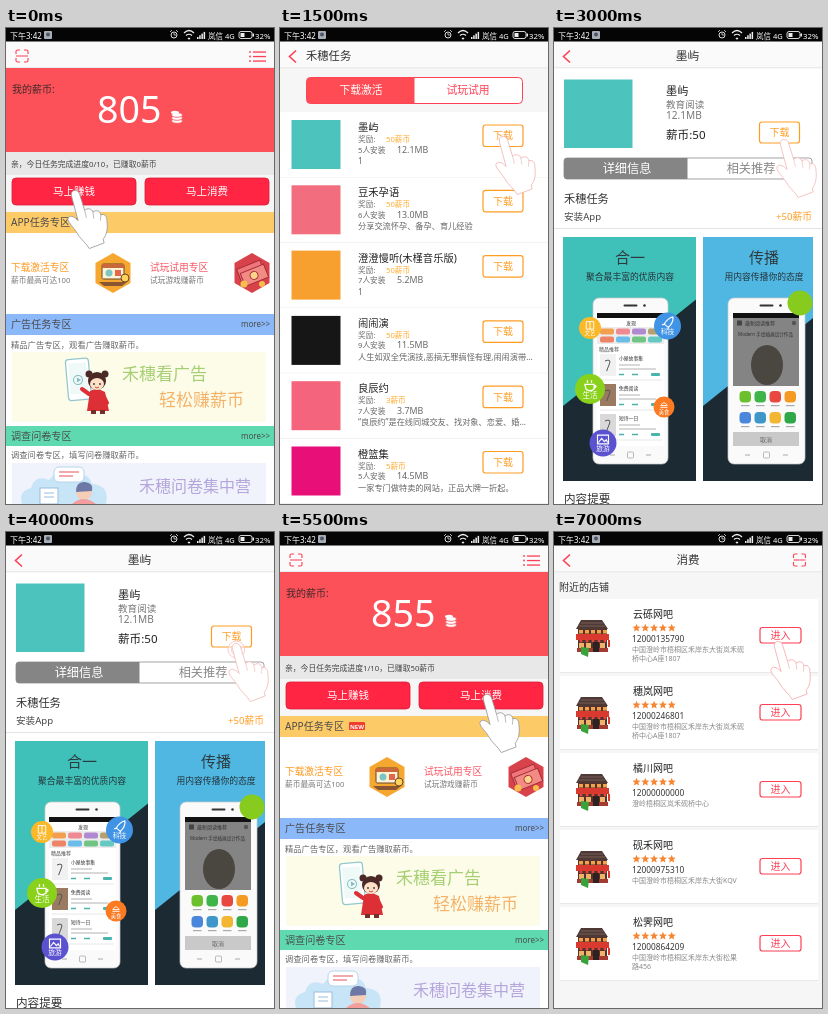
Animation of 268x476 px, one loop 8000 ms. Source, as an HTML page:

```html
<!DOCTYPE html>
<html lang="zh-CN">
<head>
<meta charset="utf-8">
<title>任务演示</title>
<style>
html, body { margin: 0; width: 100%; height: 100%; overflow: hidden; background: #f5f5f5; }
svg { display: block; width: 100vw; height: 100vh; }
text { font-family: "Noto Sans", "Noto Sans CJK SC", "Noto Sans CJK", sans-serif; white-space: pre; }
</style>
</head>
<body>
<svg id="stage" viewBox="0 0 268 476"></svg>
<script>
const RED = '#ff3f55', ORANGE = '#ff9d23', INK = '#333', GRAY = '#777', TEAL = '#4cc3bd';
const BRAND = '禾穗', APP = '墨屿';

const text = (x, y, size, str, fill = INK, extra = '') =>
  `<text x="${x}" y="${y}" font-size="${size}" fill="${fill}" ${extra}>${str}</text>`;
const mid = (x, y, size, str, fill, extra = '') =>
  text(x, y, size, str, fill, `text-anchor="middle" ${extra}`);
const rect = (x, y, w, h, fill, extra = '') =>
  `<rect x="${x}" y="${y}" width="${w}" height="${h}" fill="${fill}" ${extra}/>`;
const circle = (x, y, r, fill, extra = '') =>
  `<circle cx="${x}" cy="${y}" r="${r}" fill="${fill}" ${extra}/>`;
const path = (d, fill = 'none', stroke = 'none', width = 1, extra = '') =>
  `<path d="${d}" fill="${fill}" stroke="${stroke}" stroke-width="${width}" ${extra}/>`;
const at = (x, y, body, scale = 1) => `<g transform="translate(${x} ${y}) scale(${scale})">${body}</g>`;
const each = (list, fn) => list.map(fn).join('');

function outlineButton(x, y, w, h, label, color) {
  return rect(x, y, w, h, '#fff', `rx="2.5" stroke="${color}" stroke-width="1.2"`) +
    mid(x + w / 2, y + h / 2 + 3.7, 10, label, color);
}

function hand(x, y, stroke, tapping) {
  const outline = 'M6 8C4 1 12-1 14.5 5L20 23C23 20 28 21 29 25C32 22 37 23 37.5 28' +
    'C41 26 44 29 44 34C45 43 44 49 40 54L41 58L25 64C22 58 15 54 11 46C8 41 3 37 2 33C2 28 8 28 13 34Z';
  const rings = circle(10, 8, 9, '#fff', `fill-opacity=".45" stroke="${stroke}" stroke-width=".8"`) +
    circle(10, 8, 5.5, '#fff', `fill-opacity=".5" stroke="${stroke}" stroke-width=".8"`);
  return at(x, y, (tapping ? rings : '') +
    path(outline, '#fff', stroke, .9, 'stroke-linejoin="round"') +
    path('M20 23L22 31M29 25L30 32M37.5 28L37 34', 'none', stroke, .7), .93);
}

function statusBar() {
  return rect(0, 0, 268, 13.5, '#050505') +
    text(4, 10.5, 8, '下午3:42', '#fff') +
    rect(38, 3, 8, 8, '#a9adb8', 'rx="1"') + circle(42, 6.5, 2, '#505764') +
    at(0, -1, circle(168, 8, 3, 'none', 'stroke="#ddd"') +
      path('M168 6V8H170M164 5L166 3M170 3L172 5', 'none', '#ddd', .8) +
      path('M178 6Q183 1 188 6M180 8.5Q183 6 186 8.5M182 11L183 12L184 11', 'none', '#eee', 1.2) +
      each([0, 1, 2, 3], i => rect(191 + i * 2.2, 10 - i * 1.7, 1.5, 2 + i * 1.7, '#eee')) +
      rect(233, 4.5, 13, 7, 'none', 'stroke="#eee" stroke-width=".9" rx="2"') +
      rect(234.5, 6, 4, 4, '#eee') + rect(246.5, 6.5, 1.5, 3, '#eee')) +
    text(202, 10.5, 7.5, '岚信 4G', '#fff') + text(249, 10.5, 7.8, '32%', '#fff');
}
const header = rect(0, 13, 268, 27, '#fafafa') + rect(0, 39.5, 268, .7, '#ddd');
const back = path('M16 22.5L9.5 28.5L16 34.5', 'none', RED, 1.6);
const scanIcon = (x, y) => at(x, y,
  path('M0 4V1.5Q0 0 1.5 0H4M8 0H10.5Q12 0 12 1.5V4M12 8V10.5Q12 12 10.5 12H8M4 12H1.5Q0 12 0 10.5V8M0 6H12', 'none', RED, 1.1));

function bar(y, h, color, title, more) {
  return rect(0, y, 268, h, color) + text(5, y + 14, 10.1, title, '#4b4b4b') +
    (more ? text(235, y + 13, 8, 'more&gt;&gt;', '#4b4b4b') : '');
}

const hexagon = (x, y, fill) => at(x, y, path('M0-20L17.5-10V10L0 20L-17.5 10V-10Z', fill));

function hexIcons() {
  return hexagon(107, 245, '#f6a72f') +
    at(107, 245, rect(-11, -9, 22, 15, '#fff3d6', 'rx="1.5" stroke="#6a4529"') +
      rect(-11, -9, 22, 4, '#c9683b') + circle(-4, 0, 3.5, '#7bc6c3') + rect(2, -3, 6, 6, '#e3674a') +
      path('M-14 9H14L9 13H-9Z', '#8a5632') + circle(12, 5, 4, '#ffd35b', 'stroke="#6a4529"')) +
    hexagon(246, 245, '#d8434b') +
    at(246, 245, `<g transform="rotate(-22)">${rect(-13, -9, 25, 14, '#ef767a', 'stroke="#a52c39"')}` +
      rect(-11, -4, 25, 14, '#f28b83', 'stroke="#a52c39"') + circle(1, 3, 4, '#ffd48a', 'stroke="#a52c39"') + '</g>' +
      circle(-8, 11, 3.5, '#f7bd4d') + circle(10, 11, 3, '#f7bd4d'));
}

function adBanner() {
  return rect(6, 324, 254, 70, '#fcfce9') +
    `<g transform="rotate(-5 71 352)">${rect(61, 331, 23, 41, '#fff', 'rx="3" stroke="#93c9ce" stroke-width="1.3"')}` +
    rect(63.5, 335, 18, 31, '#eef9f8') + circle(72, 352, 4.5, 'none', 'stroke="#83bcc2"') +
    path('M71 349.5V354.5L75 352Z', '#83bcc2') + '</g>' +
    path('M84 363Q91 359 99 364L103 383H81Z', '#dc3036') +
    path('M83 366L76 361M97 367L101 375', 'none', '#dc3036', 4, 'stroke-linecap="round"') +
    circle(91, 353, 9, '#4a2926') + circle(83, 346, 3.5, '#4a2926') + circle(99, 346, 3.5, '#4a2926') +
    `<ellipse cx="91" cy="356" rx="7" ry="6" fill="#ffe0c6"/>` +
    circle(88, 356, .9, INK) + circle(94, 356, .9, INK) + path('M89 359Q91 361 93 359', 'none', '#c74b42') +
    rect(85, 382, 5, 4, '#70302b') + rect(94, 382, 5, 4, '#70302b') +
    text(116, 352, 17, BRAND + '看广告', '#a5cf72', 'font-weight="300"') +
    text(153, 378, 17, '轻松赚薪币', '#f5b269', 'font-weight="300"');
}

function surveyBanner() {
  return rect(6, 435, 254, 41, '#f0f3fc') +
    path('M16 476Q12 463 25 460Q29 446 43 452Q56 435 70 449Q82 443 86 456Q104 457 100 476Z', '#c7e5f6') +
    rect(48, 439, 30, 15, '#fff', 'rx="5" stroke="#b8d5ea"') + path('M53 444H73M53 448H67', 'none', '#f08c92', 1.3) +
    circle(78, 464, 8, '#f5ceb7') + path('M70 464Q70 453 79 454Q88 455 86 463Z', '#6d78a7') +
    path('M66 476Q77 466 90 476Z', '#f49d9d') + rect(34, 460, 18, 16, '#fff', 'stroke="#99bddd"') +
    path('M38 465H48M38 469H48', 'none', '#99bddd') +
    text(133, 464, 16, BRAND + '问卷集中营', '#b5a5da');
}

function home(coins, done, earned, handX, tapping) {
  const cta = (x, label) => rect(x, 150, 124, 27, '#ff2543', 'rx="4" stroke="#d91c39" stroke-width=".8"') +
    mid(x + 62, 167.3, 10.5, label, '#fff');
  return rect(0, 13, 268, 463, '#fff') + header + scanIcon(10, 22) +
    each([24, 28.5, 33], y => circle(244, y, .9, RED) + rect(247, y - .6, 13, 1.3, RED)) +
    rect(0, 40, 268, 84, '#fc5159') +
    text(6, 65, 10, '我的薪币:', '#40292b') + text(91, 95, 37.6, coins, '#fff') +
    each([93, 90, 87], y => `<ellipse cx="171" cy="${y}" rx="5.5" ry="2.3" fill="#fff" stroke="#fc5159" stroke-width=".8"/>`) +
    `<ellipse cx="169" cy="84.5" rx="4" ry="1.7" fill="#fff"/>` +
    rect(0, 124, 268, 23, '#e8e8e8') +
    text(5, 138.5, 7.8, `亲，今日任务完成进度${done}/10，已赚取${earned}薪币`, '#444') +
    rect(0, 147, 268, 37, '#f6f6f6') + cta(6, '马上赚钱') + cta(139, '马上消费') +
    bar(184, 21, '#fdca68', 'APP任务专区') +
    rect(69, 190, 16, 8, '#ef3f30', 'rx="1"') + mid(77, 196.5, 6, 'NEW', '#fff', 'font-weight="700"') +
    text(5, 243, 9.7, '下载激活专区', '#ff981c') + text(5, 255, 7.7, '薪币最高可达100', GRAY) +
    text(144, 243, 9.7, '试玩试用专区', '#fb5360') + text(144, 255, 7.7, '试玩游戏赚薪币', GRAY) +
    hexIcons() +
    bar(286, 21, '#8bb8f8', '广告任务专区', true) +
    text(5, 319.5, 8.3, '精品广告专区，观看广告赚取薪币。', '#666') + adBanner() +
    bar(398, 20, '#5fdab0', '调查问卷专区', true) +
    text(5, 430, 8.3, '调查问卷专区，填写问卷赚取薪币。', '#666') + surveyBanner() +
    hand(handX, 161, '#999', tapping);
}

const apps = [
  [APP, 50, 5, '12.1', '1', TEAL],
  ['豆禾孕语', 50, 6, '13.0', '分享交流怀孕、备孕、育儿经验', '#f26d7d'],
  ['澄澄慢听(木槿音乐版)', 50, 7, '5.2', '1', '#f7a02f'],
  ['闹闹演', 50, 9, '11.5', '人生如双全凭演技,恶搞无罪搞怪有理,闹闹演带...', '#161616'],
  ['良辰约', 3, 7, '3.7', '“良辰约”是在线同城交友、找对象、恋爱、婚...', '#f4647d'],
  ['橙篮集', 5, 5, '14.5', '一家专门做特卖的网站，正品大牌一折起。', '#e90f78']
];

function appRow([name, coins, users, size, note, color], i) {
  return at(0, i * 65.3,
    rect(0, 84, 268, 65.3, '#fff') + rect(0, 149, 268, 1.2, '#e3e3e3') +
    rect(11.5, 92, 49, 49, color) +
    text(78, 103, 10.3, name, '#222') +
    text(78, 114, 7.7, '奖励:', GRAY) + text(106, 114, 7.7, coins + '薪币', '#ffac2f') +
    text(78, 124.5, 7.7, users + '人安装', '#666') + text(117, 124.5, 8.8, size + 'MB', '#666') +
    text(78, 136, 8.2, note, '#666') +
    outlineButton(203, 97, 40, 21.5, '下载', ORANGE));
}

function taskList(tapping) {
  return rect(0, 13, 268, 463, '#f6f6f6') + header + back + text(26, 32, 11.3, BRAND + '任务') +
    rect(26.5, 49.5, 216, 26, '#fff', `rx="4" stroke="${RED}"`) +
    path('M134.5 49.5H30.5Q26.5 49.5 26.5 53.5V71.5Q26.5 75.5 30.5 75.5H134.5Z', '#ff4b53') +
    mid(81, 66.4, 10.8, '下载激活', '#fff') + mid(188, 66.4, 10.8, '试玩试用', RED) +
    each(apps, appRow) + hand(214, 107, '#f0b4b4', tapping);
}

// Poster: coloured panel, dark lower half cut on a diagonal, and a phone.
function poster(x, w, color, title, line, phoneX, phoneW, cx) {
  return rect(x, 209, w, 244, color) +
    path(`M${x} 378L${x + w} ${378 - w * .8}V453H${x}Z`, '#1b2a33') +
    mid(cx, 235, 15, title, '#2d3a3e', 'font-weight="300"') + mid(cx, 251.5, 8.8, line, '#26343a') +
    rect(phoneX, 270, phoneW, 166, '#fafafa', 'rx="6" stroke="#c9c9c9" stroke-width=".7"') +
    rect(phoneX + phoneW / 2 - 7, 276.5, 14, 2, '#333', 'rx="1"') + circle(phoneX + phoneW / 2 + 14, 277.5, 1.3, '#333') +
    path(`M${phoneX + 17} 427H${phoneX + 22}M${phoneX + phoneW - 22} 427H${phoneX + phoneW - 17}`, 'none', '#aaa') +
    rect(phoneX + phoneW / 2 - 3, 424, 6, 6, 'none', 'rx="1" stroke="#aaa" stroke-width=".8"');
}

function firstPoster() {
  const pills = ['#f2a050', '#ef8a92', '#b08ad0', '#b5a06f', '#ee8365', '#6bbce8', '#71c584', '#65c8c3'];
  const items = [['小屋故事集', '#f1f1f1'], ['免费阅读', '#9a7a60'], ['短诗一日', '#d9d9d9']];
  const bubbles = [[36, 300, 11, '#fbb829', '文艺'], [113.5, 298, 13.5, '#4193e6', '科技'],
    [36, 361, 15, '#8ad11c', '生活'], [110, 379, 10.5, '#fb7a22', '美食'], [49, 415, 13.5, '#5a52cf', '旅游']];
  return poster(9, 133, '#3fc1ba', '合一', '聚合最丰富的优质内容', 39, 75, 76) +
    rect(43, 285, 67, 133, '#fff') + rect(43, 285, 67, 5, '#111') + mid(77, 296.5, 5, '发现', '#333') +
    rect(43, 299, 67, 17, '#ececec') +
    each(pills, (c, i) => rect(46 + i % 4 * 16, 300.5 + (i >> 2) * 8, 14, 6, c, 'rx="2"')) +
    text(45, 323, 5, '精品推荐', '#444') +
    each(items, ([title, c], i) => at(46, 326 + i * 30,
      rect(0, 0, 16, 22, c) + path('M5 7Q12 4 9 11T7 17', 'none', '#555') +
      text(19, 6, 4.8, title, '#333') + path('M19 11H40M19 15H56', 'none', '#aaa', .9) +
      path('M19 20.5H24M32 20.5H38', 'none', '#48b4ac', 1.6) + rect(51, 19, 9, 3, '#48b4ac', 'rx="1"') +
      path('M0 26H62', 'none', '#ddd', .7))) +
    each(bubbles, ([x, y, r, c, label]) => circle(x, y, r, c) +
      mid(x, y + r * .62, r * .5, label, '#fff') + bubbleIcon(x, y - r * .24, r * .34, label));
}

function bubbleIcon(x, y, s, label) {
  const shapes = {
    文艺: 'M-1-1H1V1H-1ZM0-1V1', 科技: 'M1.2-1.3Q0-1-.7.3L.2 1Q1.3 0 1.2-1.3M-.7.3L-1.2.5M.2 1L0 1.5',
    生活: 'M-1-.2H.8V.7Q0 1.4-.8.7ZM.8 0Q1.6 0 .8.6M-.5-1V-.5M.3-1V-.5',
    美食: 'M-1 .8H1M-.9.3Q0-1.3.9.3Z', 旅游: 'M-1.2-1H1.2V.9H-1.2ZM-1 .6L-.3-.3L.3.4L.7 0L1 .6'
  };
  return at(x, y, path(shapes[label], 'none', '#fff', .25), s);
}

function secondPoster() {
  const tiles = ['#6cc02e', '#3fb549', '#e8483f', '#f59a23', '#4a86dc', '#3e96ca', '#f2b632', '#2fa84a'];
  return poster(149, 110, '#50b7e3', '传播', '用内容传播你的态度', 174, 77, 210) +
    rect(179, 285, 66, 133, '#848484') + rect(179, 285, 66, 5, '#111') +
    text(191, 297, 5, '最新阅读推荐', '#333') + rect(183, 292.5, 5, 5, '#444') + circle(240, 295, 2.2, '#555') +
    text(184, 308, 4.6, 'Modern 手绘插画设计作品', '#333') +
    `<ellipse cx="213" cy="337" rx="16" ry="20" fill="#4a4640"/>` +
    rect(179, 358, 66, 46, '#fafafa') +
    each(tiles, (c, i) => {
      const x = 185.5 + i % 4 * 15, y = 363 + (i >> 2) * 21;
      return rect(x, y, 11.5, 11.5, c, 'rx="4"') + rect(x + 1.5, y + 14, 8.5, 1.2, '#aaa');
    }) +
    rect(179, 404, 66, 14, '#c9c9c9') + mid(212, 413.5, 6, '取消', '#666') +
    circle(246, 275, 12.5, '#86cb1d');
}

function detail(installed, tapping) {
  return rect(0, 13, 268, 463, '#fff') + header + back + mid(133.5, 32, 11.8, APP) +
    rect(10, 51.5, 68.5, 68.5, TEAL) +
    text(112, 67, 11.2, APP, '#222') + text(112, 79.5, 9.6, '教育阅读', GRAY) +
    text(112, 91, 10.1, '12.1MB', GRAY) + text(112, 110.5, 11.6, '薪币:50', '#222') +
    outlineButton(205.5, 94, 40, 21, installed ? '打开' : '下载', ORANGE) +
    (installed ? text(221, 90, 20, '+50', ORANGE, 'font-weight="600"') : '') +
    rect(10, 130, 248, 21, '#fff', 'rx="3" stroke="#999" stroke-width=".9"') +
    path('M133.5 130H13Q10 130 10 133V148Q10 151 13 151H133.5Z', '#858585') +
    mid(73, 145, 12.2, '详细信息', '#fff') + mid(197, 145, 12.2, '相关推荐', '#888') +
    text(10, 175, 11.2, BRAND + '任务') + text(10, 192, 9.6, '安装App', '#444') +
    text(222, 192, 9.7, '+50薪币', ORANGE) + rect(0, 200, 268, .8, '#ddd') +
    firstPoster() + secondPoster() + text(10, 474.5, 11.6, '内容提要') +
    (installed ? '' : hand(221, 110, '#f3baba', tapping));
}

const longAddress = ['中国澄岭市梧桐区禾岸东大街岚禾砚', '桥中心A座1807'];
const shops = [
  ['云砾网吧', '12000135790', longAddress],
  ['穗岚网吧', '12000246801', longAddress],
  ['橘川网吧', '12000000000', ['澄岭梧桐区岚禾砚桥中心']],
  ['砚禾网吧', '12000975310', ['中国澄岭市梧桐区禾岸东大街KQV']],
  ['松霁网吧', '12000864209', ['中国澄岭市梧桐区禾岸东大街松果', '路456']]
];

function star(x, y, r) {
  const points = Array.from({ length: 10 }, (_, i) => {
    const a = i * Math.PI / 5, k = i % 2 ? r * .45 : r;
    return `${x + k * Math.sin(a)},${y - k * Math.cos(a)}`;
  });
  return `<polygon points="${points.join(' ')}" fill="#f58634"/>`;
}

const shopIcon = path('M22 97L27 88H48L54 97Z', '#4d3a36') + path('M27 91H49M25 94H51', 'none', '#80655b', .8) +
  rect(24, 97, 29, 22, '#55332c') + rect(22, 102, 33, 6, '#d9392e') +
  each([25, 31, 37, 43, 49], x => rect(x, 98, 4, 3.5, '#f0a34b') + circle(x + 2, 109, 1.5, '#e8453a')) +
  each([25, 32, 46], x => rect(x, 111, 5, 5, '#f1b36a')) +
  rect(23, 116, 31, 4, '#a43a31') + rect(39, 110, 6, 10, '#2d2222') + rect(54, 108, 2, 7, '#d9392e') +
  path('M27 115L35 116L34 125L27 122Z', '#39a33b');

function shopRow([name, phone, address], i) {
  return at(0, i * 77,
    rect(6, 67, 258, 73, '#fff') + rect(6, 140, 258, 1, '#e8e8e8') + shopIcon +
    text(79, 86, 10, name, '#222') + each([0, 1, 2, 3, 4], n => star(82.5 + n * 8.8, 96, 4.3)) +
    text(78, 110, 8.3, phone, '#333') +
    each(address, (line, n) => text(78, 119.5 + n * 9, 7, line, '#888')) +
    outlineButton(206, 95.5, 41, 15.5, '进入', RED));
}

const shopList = () => rect(0, 13, 268, 463, '#f6f6f6') + header + back + mid(134, 32, 11.5, '消费') +
  scanIcon(239.5, 22) + text(5, 59, 10, '附近的店铺') + each(shops, shopRow) + hand(215, 108, '#f5a9ad', false);

const DURATION = 8000;
const steps = [
  [0, home(805, 0, 0, 60, false)],
  [1000, home(805, 0, 0, 60, true)],
  [1500, taskList(false)],
  [2500, taskList(true)],
  [3000, detail(false, false)],
  [4000, detail(false, true)],
  [4500, detail(true, false)],
  [5500, home(855, 1, 50, 198, false)],
  [6500, home(855, 1, 50, 198, true)],
  [7000, shopList()]
];

const stage = document.getElementById('stage');
stage.innerHTML = each(steps, ([, body]) => `<g class="scene" display="none">${body}</g>`) + statusBar();
const scenes = [...stage.querySelectorAll('.scene')];
let current = -1;

function tick() {
  const t = performance.now() % DURATION;
  const index = steps.findLastIndex(([start]) => t >= start);
  if (index !== current) {
    scenes.forEach((scene, i) => scene.setAttribute('display', i === index ? 'inline' : 'none'));
    current = index;
  }
  requestAnimationFrame(tick);
}
tick();
</script>
</body>
</html>
```
